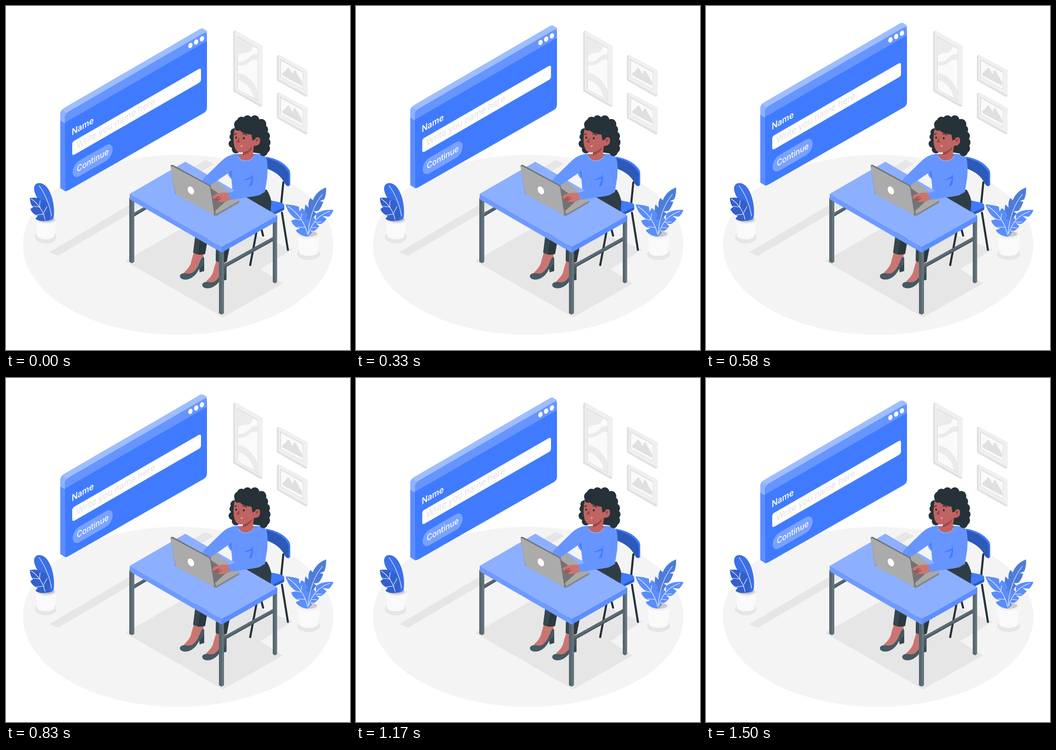
Write an HTML page that moves like this. It is 748 by 749 pixels and loops after 1540 ms.

```html
<!DOCTYPE html>
<html lang="en">
<head>
<meta charset="utf-8">
<title>Name form</title>
<style>
html, body { margin: 0; width: 100%; height: 100%; overflow: hidden; background: #fff }
svg { display: block; width: 748px; height: 749px }
text { font-family: Inter, "Open Sans", sans-serif }
.vein { fill: none; stroke: #fff; stroke-width: 1.1; stroke-linecap: round }
</style>
</head>
<body>
<svg viewBox="0 0 748 749">
<defs>
  <g id="picture">
    <path fill="#e0e0e0" d="M589 109l4-3 63 34v55l-4 3-63-36z"/>
    <path fill="#f0f0f0" d="M593 106l63 34v55l-63-35z"/>
    <path fill="#e0e0e0" d="M596 115l50 28v39l-50-28z"/>
    <path fill="#fafafa" d="M598 119l47 26v35l-47-26z"/>
    <path fill="#e0e0e0" d="M601 146q6-3 11-11q3-2 5 3l6 10q3-5 7-4q2 1 4 5l10 17v8l-43-23z"/>
    <ellipse cx="628.500" cy="144.500" rx="3" ry="4" fill="#e0e0e0" transform="rotate(-25 628.500 144.500)"/>
  </g>
  <g id="foot">
    <path fill="#c97672" d="M409 535l21 5-2 14-8 18-20 14-14-5q16-14 17-26z"/>
    <path fill="#37474f" d="M419 562l12-14v29l-10 3z"/>
    <path fill="#455a64" d="M378 587q3-6 13-5 8 2 14-1 10-7 16-22 4-13 9-13 2 8 0 16-4 6-10 10-8 18-24 23-18 3-18-8z"/>
  </g>
</defs>

<!-- floor and shadows -->
<ellipse cx="374.500" cy="520" rx="337.500" ry="196" fill="#f4f4f4"/>
<g fill="#e6e6e6">
  <path d="M94 536L434 335l18 9-339 200z"/>
  <path d="M259 555l174-100 190 75-70 43 49 31-130 74z"/>
  <ellipse cx="86.500" cy="503" rx="23.500" ry="14"/>
  <ellipse cx="658" cy="540" rx="25" ry="13"/>
</g>

<!-- wall pictures -->
<path fill="#e0e0e0" d="M494 56l4-3 60 34v130l-4 3-60-34z"/>
<path fill="#f0f0f0" d="M498 53l60 34v130l-60-34z"/>
<path fill="#e0e0e0" d="M502 65l46 26v117l-46-27z"/>
<path fill="#fafafa" d="M504 69l43 24v112l-43-24z"/>
<g fill="#ebebeb">
  <path d="M507 71l30 17q-3 14-17 14-9 0-15 6v-38z"/>
  <path d="M505 121q12 3 24-9 7-9 18-7v12q-11-1-18 5-10 9-24 8z"/>
  <path d="M505 146q27 4 42 39v20l-8-5q-7-30-34-39z"/>
</g>
<use href="#picture"/>
<use href="#picture" y="82"/>

<!-- form window -->
<g id="panel">
  <path fill="#5c8eff" d="M118 234l14-2v171l-3 .5-11-7z"/>
  <path fill="#9fbeff" d="M118 236q0-10 10-15L421 50.500q5-3 8-1l8 5v20L129 256l-11-7z"/>
  <path fill="#8db2ff" d="M118 236q0-7 4-10l9 6-2 23-11-7z"/>
  <path fill="#407bff" d="M128 245q0-9 8-14L430 63q7-4 7 4v154q0 8-7 12L136 401q-7 4-7-3z"/>
  <path fill="#6695ff" d="M128 254v-10q0-9 8-14L430 59q7-4 7 4v13z"/>
  <g fill="#fff">
    <ellipse cx="401" cy="86" rx="4.400" ry="6" transform="rotate(22 401 86)"/>
    <ellipse cx="413.500" cy="78.500" rx="4.400" ry="6" transform="rotate(22 413.500 78.500)"/>
    <ellipse cx="426" cy="71.500" rx="4.400" ry="6" transform="rotate(22 426 71.500)"/>
    <rect width="280" height="30.500" rx="5" transform="translate(144 296) skewY(-30)"/>
  </g>
  <rect width="87" height="34" rx="15" ry="17" fill="#79a2ff" transform="translate(145 345) skewY(-30)"/>
  <text transform="matrix(.866 -.5 0 1 143 282)" font-size="19.500" font-weight="600" fill="#fff">Name</text>
  <text transform="matrix(.866 -.5 0 1 153 311.500)" font-size="20.200" fill="#e0e0e0">Write you name here</text>
  <text transform="matrix(.866 -.5 0 1 154 362)" font-size="18.500" font-weight="500" fill="#fff">Continue</text>
</g>

<!-- left plant -->
<path fill="#fafafa" d="M65 466l3 36q7 6 19 6t18-6l5-36z"/>
<ellipse cx="87.500" cy="466" rx="22.500" ry="9" fill="#f0f0f0"/>
<ellipse cx="88" cy="465" rx="18" ry="6.500" fill="#c9c9c9"/>
<path fill="#3b70e8" d="M89 466C84 432 62 418 61 398c0-12 11-16 22-9 14 9 24 42 21 69-1 8-8 10-15 8z"/>
<path fill="#3260cd" d="M84 468q-15 1-20-5l5-6q-12-4-16-15l6-4q-7-7-7-20 12-2 22 1l2 8 3-6q8 4 12 11l-3 5 6-2q4 14 0 32z"/>
<path class="vein" d="M72 391q20 28 27 66M55 420q24 17 30 45M73 436l1-12M82 450l7-13M75 438l-16-2M83 453l-17 2"/>

<!-- right plant -->
<path fill="#fafafa" d="M634 497l4 41q7 6 20 6t20-6l4-41z"/>
<ellipse cx="658" cy="497" rx="23.500" ry="10" fill="#f0f0f0"/>
<ellipse cx="658" cy="496" rx="18.500" ry="6.500" fill="#c9c9c9"/>
<path fill="#4d7ddb" d="M655 480q-8-30-4-48l7 7q-2-13 4-21l5 5q8-20 29-28 1 14-4 26l-10 4 8 1q-4 13-11 20l-10 1 6 5q-12 16-18 28z"/>
<path fill="#5b8dfb" d="M655 502q-19-3-25-14l10-4q-15-2-20-17l11-3q-17-10-23-32 17 1 29 5l1 11 5-8q10 6 13 17l-5 8 7-2q4 18-1 39z"/>
<path fill="#5b8dfb" d="M656 501q0-28 12-42l6 7v-13q14-11 38-9-3 9-10 15l-14-2 9 7q-6 8-13 11l-10-2 7 6q-5 9-13 11l-6-2 3 5q-4 7-9 8z"/>
<path class="vein" d="M657 495q4-52 31-85M613 436q35 24 43 63M704 447q-36 12-46 50M641 466l-16-3M650 482l-15-1M641 464l2-12M670 471l16-1M664 482l12 1"/>

<!-- chair -->
<g fill="none" stroke="#263238" stroke-width="4.500" stroke-linecap="round">
  <path d="M603 384l-5 50M600 450l13 81M545 490l-14 74M554 480l5 20"/>
</g>
<path fill="#407bff" d="M565 328q35 6 50 27 3 4 3 9v26q-6 5-12-4-10-22-41-33z"/>
<path fill="#2d59b8" d="M565 331q35 8 47 28 3 4 3 8v25q-5 1-9-6-10-22-41-33z"/>
<path fill="#407bff" d="M560 420l38 8q7 2 7 7v6q0 4-6 6l-29 13z"/>
<path fill="#2d59b8" d="M580 450l25-12v5l-25 13z"/>

<!-- woman, behind the desk -->
<use href="#foot"/>
<use href="#foot" x="48.500" y="19"/>
<path fill="#2b393f" d="M413 490l-6 47q12 7 26 3l7-40zM457 520l-1 35q12 6 24 2l8-40z"/>
<path fill="#37474f" d="M413 490l-6 47 10 3 8-45zM457 520l-1 35 8 3 3-38z"/>
<path fill="#2f3e46" d="M518 400l49 0q8 13 10 26l-2 26-57-30z"/>
<path fill="#6695ff" d="M492 324q10-3 17-2h34q18 0 23 9 4 12 2 42l-5 32q-19 12-43 11l-28-12q0-13-2-27-10-9-8-22z"/>

<!-- desk -->
<path fill="#5d6b72" d="M278 450l30-17v7l-30 18zM474 562l106-59v9l-106 59z"/>
<path fill="#455a64" d="M278 455l30-17v3l-30 18zM474 568l106-59v3l-106 59z"/>
<path fill="#56676f" d="M268 418h6v142l-6-3zM463 530h6v142l-6-3zM580 463h5v141l-5-3z"/>
<path fill="#63747c" d="M274 418h5v139l-5 3zM469 530h5v139l-5 3zM585 463h4.500v138l-4.500 3z"/>
<path fill="#8cafff" d="M269 409l121-70 200 117-121 69z"/>
<path fill="#6e9aff" d="M269 409l200 116v12L269 421z"/>
<path fill="#5c8eff" d="M469 525l121-69v12l-121 69z"/>

<!-- laptop and arms -->
<path fill="#858585" d="M438 379l10-4 59 49v4l-48 28q-4 2-8-1z"/>
<path fill="#a9a9a9" d="M438 379l10-4 59 49-50 29z"/>
<path fill="#737373" d="M445 396l36 26-27 25z"/>
<path fill="#6695ff" d="M500 322q-18 2-31 15l-38 37q-5 7-5 12 5 5 11 6h5l44-30q10-16 14-35z"/>
<path fill="#c97672" d="M484 407q-19-3-33 6l-3 5q4 2 11-1l-5 5 4 3q13 5 31-4z"/>
<path fill="#a94f51" d="M454 416l13-2-9 7 13-4-10 8q-8-1-7-4l4-5z"/>
<path fill="#6695ff" d="M560 324q10 9 8 40l-7 37q-3 10-15 12l-56 9q-6-7-7-15l45-14q7-20 7-33z"/>
<path fill="#407bff" d="M528 393q7-13 8-30 3 17-2 28-14 5-32 10zM486 362q2 8 6 12-2-8-2-16zM535 375q-8 4-18 4 11-4 19-9z"/>
<path fill="#737373" d="M358 349q0-4 5-3l82 45 10 63-2 1-85-46z"/>
<path fill="#ababab" d="M358 351q0-3 4-2l78 42q3 2 4 6l9 57-4-1-77-41q-3-2-4-6z"/>
<ellipse cx="402" cy="401.500" rx="6.200" ry="9.200" fill="#fff" transform="rotate(-28 402 401.500)"/>

<!-- head -->
<g fill="#263238">
  <path d="M501 251l42-8 24 34-2 46-35-5-38-10z"/>
  <g id="curls"></g>
</g>
<path fill="#bf6463" d="M515 306v16l-11 3q5 11 18 12 14-1 18-14l-3-2 3-23z"/>
<path fill="#974849" d="M515 319q14-3 21-14-2 14-21 20z"/>
<path fill="#bf6463" d="M497 268q-4 21-1 35 3 15 13 16 16 0 28-15 8 2 14-4 3-8 0-13-6-4-11 4l-4-11q-18 0-24-10-9 4-15-2z"/>
<path fill="#263238" d="M496 264q5 5 12 6 6 8 17 8 4 0 8-2l3 17 6-3-2-27-25-10z"/>
<g fill="none" stroke="#263238" stroke-width="1.800" stroke-linecap="round">
  <path d="M497 280l4-2M515 279q4-2 8 2"/>
</g>
<ellipse cx="500.500" cy="286.500" rx="1.900" ry="2.500" fill="#263238"/>
<ellipse cx="517" cy="288" rx="2.100" ry="2.600" fill="#263238"/>
<path fill="#974849" d="M507 287l-6 9q3 3 7 1zM543 291q4-3 6 0l-5 7z"/>
<path fill="#ef9a9a" d="M510 304q3-2 5 0-1 3-4 3z"/>
<path d="M505 328q6 10 17 9 13-1 17-11" fill="none" stroke="#a9c3ff" stroke-width="1.500" stroke-dasharray="2 1"/>
</svg>
<script>
const PERIOD = 1540;
const panel = document.getElementById("panel");
const curls = [
  [507, 258, 11], [512, 251, 10], [525, 248, 10], [541, 248, 10], [555, 257, 11],
  [560, 269, 10], [564, 283, 10], [564, 297, 11], [563, 310, 11], [560, 318, 9],
  [497, 275, 9], [494, 285, 8], [493, 300, 9], [500, 312, 9]
];
document.getElementById("curls").innerHTML =
  curls.map(([x, y, r]) => `<circle cx="${x}" cy="${y}" r="${r}"/>`).join("");

function draw() {
  const phase = 2 * Math.PI * (performance.now() + 20) / PERIOD;
  const lift = 6.75 * (1 - Math.cos(phase)) + 0.6 * Math.sin(phase) ** 2;
  panel.setAttribute("transform", `translate(0 ${-lift.toFixed(2)})`);
  requestAnimationFrame(draw);
}
draw();
</script>
</body>
</html>
```
